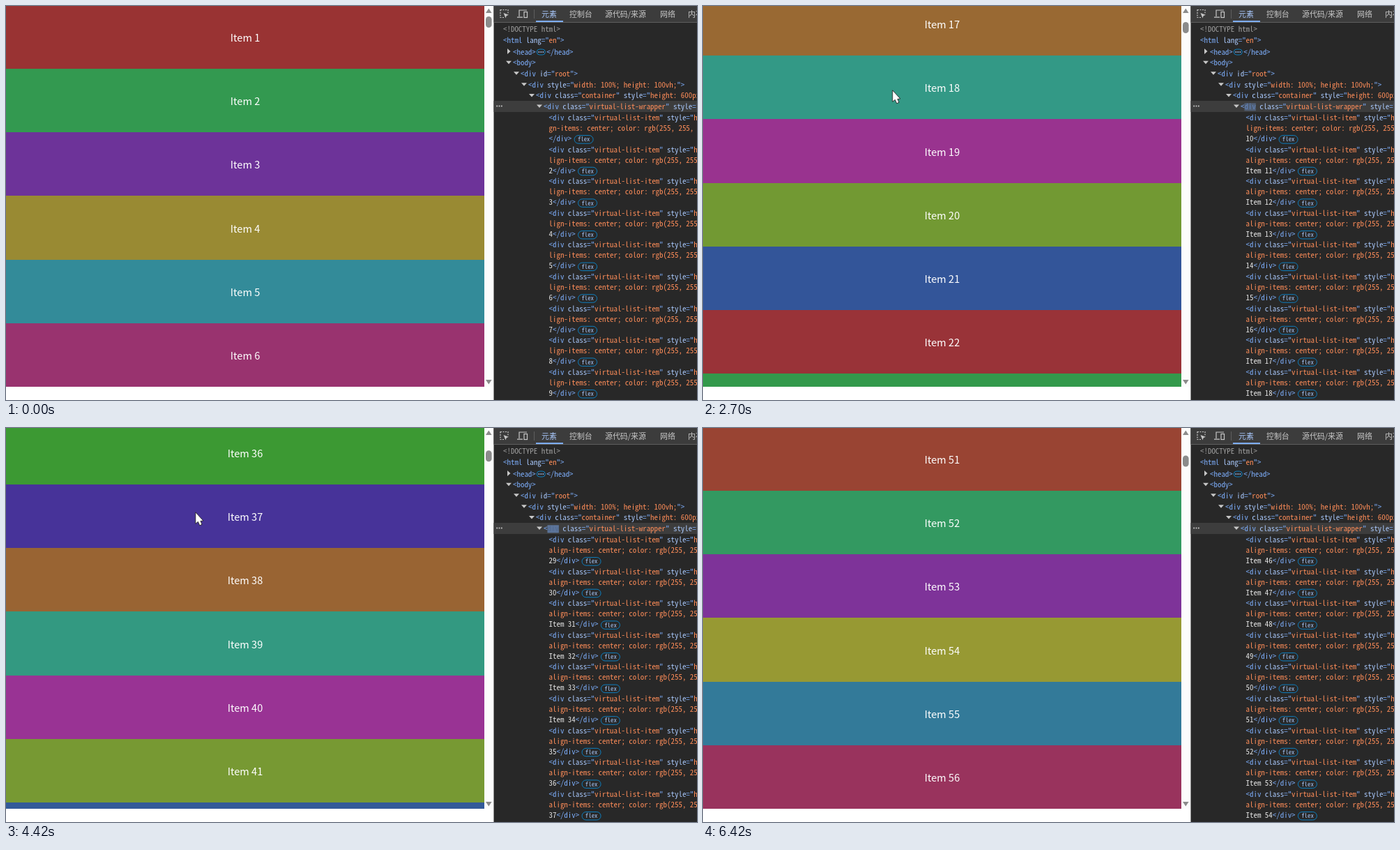
An HTML page with a canvas for the animation above (7.14 s loop, 991 by 565 pixels).

```html
<!DOCTYPE html>
<html lang="en">
<head>
<meta charset="utf-8">
<style>
html, body { margin: 0; width: 100%; height: 100%; overflow: hidden; background: #fff; }
canvas { display: block; }
</style>
</head>
<body>
<canvas id="stage" width="991" height="565"></canvas>
<script>
const ctx = document.getElementById('stage').getContext('2d');
const LOOP = 7140, TICK = 40;
const PITCH = 91.18, LIST_TOP = -1.1, LIST_W = 686, LIST_H = 546;
const CHAR = 5.471;
const MONO_FAMILY = '"Noto Sans Mono CJK SC", "Liberation Mono", monospace';
const SANS = '"Noto Sans CJK SC", "Noto Sans", sans-serif';
const FLICK = 230, LAG = 60, FADE = 600, OVERSCAN = 13;
const COLORS = { tag: '#7cacf8', attr: '#a8c7fa', value: '#fe8d59', text: '#e3e3e3' };

// Font size at which one monospace character is the given width
function mono(width) {
  ctx.font = `100px ${MONO_FAMILY}`;
  return `${100 * width / ctx.measureText('0').width}px ${MONO_FAMILY}`;
}
const CODE_FONT = mono(CHAR), BADGE_FONT = mono(4.4);

// Wheel flicks: start time and the item index they settle on
const flicks = [[1350, 4], [1760, 9], [1990, 14], [2626, 19], [3060, 24], [3430, 29],
  [3830, 33], [4350, 38], [4740, 43], [5110, 47], [5530, 50]];

const clamp = v => Math.min(1, Math.max(0, v));
const mix = (a, b, p) => a + (b - a) * p;

function scrollAt(t) {
  let pos = 0;
  for (const [start, to] of flicks) {
    pos = mix(pos, to, 1 - (1 - clamp((t - start) / FLICK)) ** 1.5);
  }
  return pos;
}

// Inverse of scrollAt: when an index first reaches the top
function timeAt(pos) {
  let from = 0;
  for (const [start, to] of flicks) {
    if (pos <= to) return start + FLICK * (1 - (1 - (pos - from) / (to - from)) ** (2 / 3));
    from = to;
  }
  return Infinity;
}

// Progress of a node's update highlight; 1 means none
function flashAt(t, pos) {
  const age = t - timeAt(pos) - LAG;
  return pos < 5 || age < 0 ? 1 : clamp(age / FADE);
}

function rect(x, y, w, h, color) {
  ctx.fillStyle = color;
  ctx.fillRect(x, y, w, h);
}

function poly(points, color) {
  ctx.beginPath();
  points.forEach(([x, y]) => ctx.lineTo(x, y));
  ctx.closePath();
  ctx.fillStyle = color;
  ctx.fill();
}

function pill(x, y, w, h, color) {
  ctx.beginPath();
  ctx.roundRect(x, y, w, h, h / 2);
  ctx.strokeStyle = color;
  ctx.lineWidth = 1;
  ctx.stroke();
}

function write(text, x, y, color) {
  ctx.fillStyle = color;
  ctx.fillText(text, x, y);
  return x + ctx.measureText(text).width;
}

// Draws one line of highlighted markup, y being its middle; returns the end x
function markup(source, x, y, mode = 'text', flash = 1) {
  ctx.font = CODE_FONT;
  const base = y + 3.6;
  for (const token of source.match(/<\/?\w+|>|="|"|[^<>="]+/g)) {
    if (token === '<div' && flash < 1) {
      x = write('<', x, base, COLORS.tag);
      rect(x, y - 5, CHAR * 3, 11, `rgba(124,172,248,${1 - flash})`);
      const [r, g, b] = [124, 172, 248].map(c => mix(40, c, flash));
      x = write('div', x, base, `rgb(${r},${g},${b})`);
      mode = 'attr';
    } else if (token[0] === '<') {
      x = write(token, x, base, COLORS.tag);
      mode = 'attr';
    } else if ('>="'.includes(token)) {
      x = write(token, x, base, COLORS.tag);
      mode = token === '>' ? 'text' : token === '"' ? 'attr' : 'value';
    } else {
      x = write(token, x, base, COLORS[mode]);
    }
  }
  return x;
}

function drawList(scroll) {
  ctx.save();
  ctx.beginPath();
  ctx.rect(0, 0, LIST_W, LIST_H);
  ctx.clip();
  ctx.font = `500 14.59px ${SANS}`;
  ctx.textAlign = 'center';
  const first = Math.floor(scroll);
  for (let i = first; i < first + 8; i++) {
    const y = LIST_TOP + (i - scroll) * PITCH;
    rect(0, Math.round(y), LIST_W, PITCH + 1, `hsl(${i * 137 % 360}, 50%, 40%)`);
    write(`Item ${i + 1}`, LIST_W / 2, y + 52.2, '#fff');
  }
  ctx.restore();

  rect(LIST_W, 0, 14, LIST_H, '#fcfcfc');
  poly([[688, 10], [692.3, 3.5], [696.6, 10]], '#8b8b8b');
  poly([[688, 536], [692.3, 542.5], [696.6, 536]], '#8b8b8b');
  ctx.beginPath();
  ctx.roundRect(688, 15 + scroll * 0.49, 8.6, 16, 4.3);
  ctx.fillStyle = '#8b8b8b';
  ctx.fill();
}

function drawToolbar() {
  rect(699.5, 0, 292, 23, '#3c3c3c');
  rect(699.5, 23, 292, 1, '#5e5e5e');
  ctx.strokeStyle = '#c7c7c7';
  ctx.lineWidth = 1.2;
  ctx.setLineDash([2, 1.5]);
  ctx.strokeRect(709, 5.5, 11, 11);
  ctx.setLineDash([]);
  rect(714, 10.5, 8, 8, '#3c3c3c');
  poly([[713.5, 10], [721, 12.8], [717.8, 14], [716.5, 17.3]], '#c7c7c7');
  ctx.beginPath();
  ctx.moveTo(747, 6);
  ctx.lineTo(736, 6);
  ctx.lineTo(736, 15);
  ctx.moveTo(733, 16.2);
  ctx.lineTo(741, 16.2);
  ctx.stroke();
  ctx.strokeRect(743, 8.5, 4.5, 8);
  rect(757, 5, 1, 13, '#5e5e5e');
  ctx.font = `10.94px ${SANS}`;
  const tabs = [['元素', 768], ['控制台', 808], ['源代码/来源', 859], ['网络', 938], ['内存', 978]];
  tabs.forEach(([label, x], i) => write(label, x, 15.8, i ? '#c7c7c7' : '#a8c7fa'));
  rect(760, 21, 39, 2, '#7cacf8');
}

function arrow(x, y, open) {
  poly(open ? [[x - 4, y - 2], [x + 4, y - 2], [x, y + 2.5]]
            : [[x - 2, y - 4], [x + 2.5, y], [x - 2, y + 4]], '#c7c7c7');
}

function drawNode(n, y, flash) {
  const hue = (n - 1) * 137 % 360;
  const ramp = 1 - Math.abs(hue / 60 % 2 - 1);
  const wide = Math.round(51 + 102 * ramp) > 99;
  const head = n === 1 ? 'gn' : n <= 10 ? 'lign' : 'align';
  const label = n === 1 ? '' : n > 10 && wide ? `Item ${n}` : `${n}`;
  markup('<div class="virtual-list-item" style="height', 778.5, y, 'text', flash);
  markup(`${head}-items: center; color: rgb(255, 255, 255`, 778.5, y + 15, 'value');
  const end = markup(`${label}</div>`, 778.5, y + 30);
  pill(end + 3.8, y + 25.3, 27, 11.5, '#0d7fc0');
  ctx.font = BADGE_FONT;
  write('flex', end + 8.6, y + 34, '#a8c7fa');
}

function drawTree(t) {
  const first = Math.max(1, Math.floor(scrollAt(t - LAG) + 1e-6) - 4);
  rect(699.5, 136, 292, 16, '#3d3d3d');
  ctx.font = CODE_FONT;
  write('<!DOCTYPE html>', 713, 37.4, '#9e9e9e');
  markup('<html lang="en">', 713, 49.5);
  const x = markup('<head>', 727, 66);
  pill(x + 1.5, 62, 12, 8, '#0d7fc0');
  [4.5, 7.5, 10.5].forEach(dx => rect(x + dx - 0.8, 65.2, 1.6, 1.6, '#a8c7fa'));
  markup('</head>', x + 15.5, 66);
  arrow(721, 65, false);
  const rows = [
    ['<body>', 81.5],
    ['<div id="root">', 97],
    ['<div style="width: 100%; height: 100vh;">', 113],
    ['<div class="container" style="height: 600px; overflow', 128.7],
    ['<div class="virtual-list-wrapper" style="transform', 144.3]
  ];
  rows.forEach(([source, y], i) => {
    const left = 727 + i * 11;
    arrow(left - 6, y - 0.8, true);
    markup(source, left, y, 'text', i === 4 ? flashAt(t, first + 4) : 1);
  });
  [704.2, 707.5, 710.8].forEach(dot => rect(dot - 0.9, 142.6, 1.8, 1.8, '#c7c7c7'));
  for (let i = 0; i < 9; i++) {
    const n = first + i;
    drawNode(n, 160.3 + i * 45.62, flashAt(t, n - OVERSCAN + 4));
  }
}

function drawCursor(t) {
  if (t < 370 || t >= 6020) return;
  const enter = 1 - (1 - clamp((t - 370) / 560)) ** 2;
  const leave = clamp((t - 5720) / 300) ** 2;
  const x = mix(98, 271, enter) - 20 * leave;
  const y = mix(519, 120, enter) + 420 * leave;
  ctx.save();
  ctx.beginPath();
  ctx.rect(0, 0, LIST_W, LIST_H);
  ctx.clip();
  ctx.translate(x + 0.8, y + 0.8);
  poly([[0, 0], [0, 16.5], [3.6, 13.6], [6, 19], [9.3, 17.5], [7.2, 12.6], [11.2, 12.2]], '#fff');
  ctx.strokeStyle = '#222';
  ctx.lineWidth = 0.9;
  ctx.stroke();
  ctx.restore();
}

function frame(now) {
  const t = Math.floor((now % LOOP - 20) / TICK) * TICK + 20;
  rect(0, 0, 991, 565, '#fff');
  drawList(scrollAt(t));
  rect(699.5, 0, 292, 565, '#282828');
  drawToolbar();
  drawTree(t);
  drawCursor(t);
  requestAnimationFrame(frame);
}
requestAnimationFrame(frame);
</script>
</body>
</html>
```
